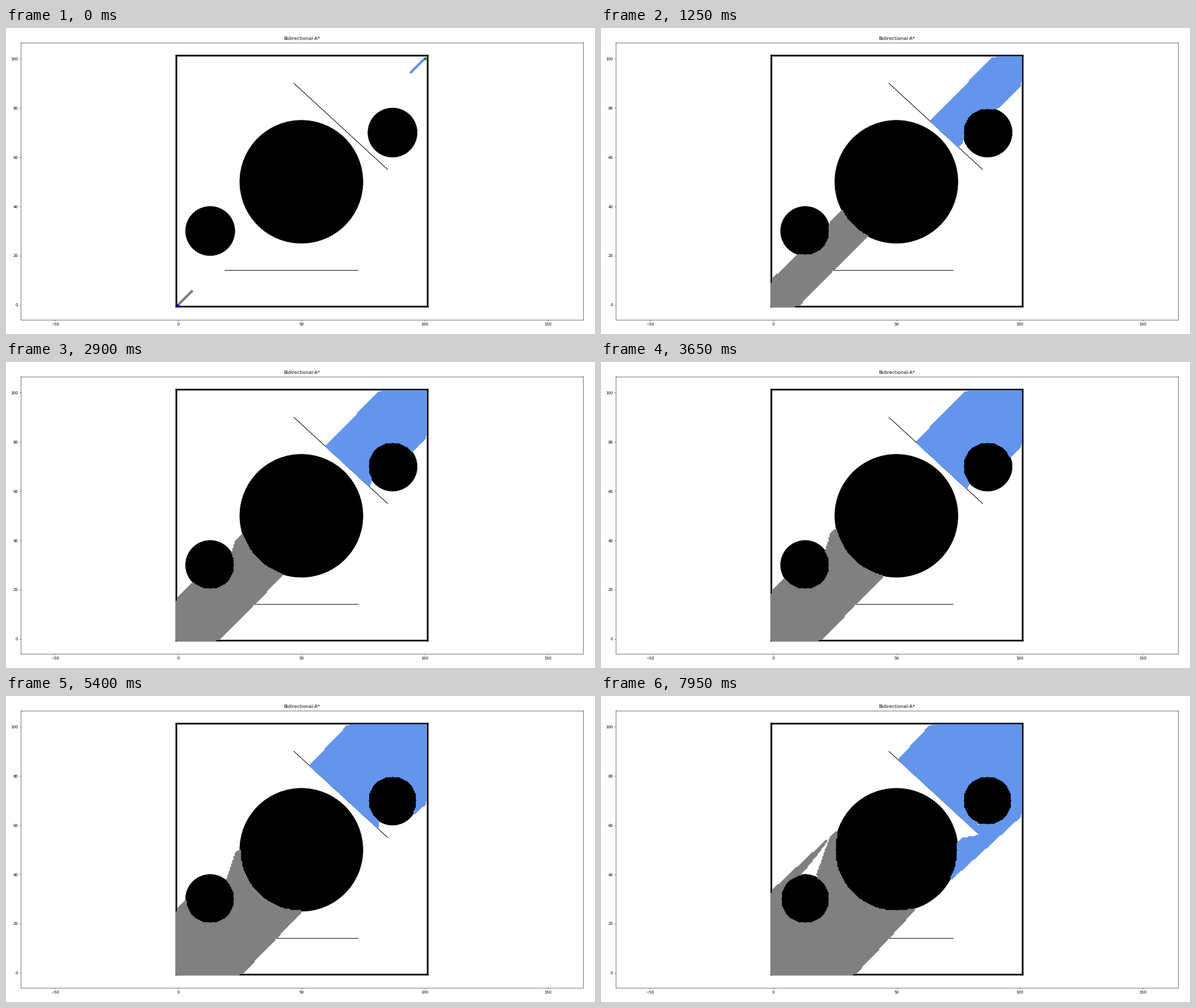
These frames come from a looping animation (1038x540 px, 8 s). A matplotlib script:

```python
import math

import matplotlib.pyplot as plt
import numpy as np
from matplotlib.animation import FuncAnimation
from matplotlib.patches import Circle, Rectangle

plt.rcParams["path.simplify"] = False
plt.rcParams["text.hinting"] = "none"

WIDTH, HEIGHT, DPI = 1038, 540, 49.5
FRAMES, INTERVAL = 160, 50

# The search runs on a grid with half-unit cells, addressed by integers.
STEP = 0.5
LOW, HIGH = -2, 202
START, GOAL = (0, 0), (200, 200)
MAX_POPS = 18000
MOVES = [(-1, 0), (-1, 1), (0, 1), (1, 1), (1, 0), (1, -1), (0, -1), (-1, -1)]

CIRCLES = [(13, 30, 10), (50, 50, 25), (87, 70, 10)]
SEGMENTS = [(47, 90, 85, 55), (19, 14, 73, 14)]
BORDER = [
    (-1, -1, 0.5, 102.5),
    (101, -1, 0.5, 102.5),
    (-1, -1, 102.5, 0.5),
    (-1, 101, 102.5, 0.5),
]

# Frame -> how far the forward search has spread along the border, in cells.
SPREAD = {25: 17, 58: 30, 89: 42, 108: 49, 130: 57, 159: 64}
REDRAW_COST = 2500


def build_walls():
    walls = set()
    cells = range(LOW, HIGH + 1)
    for i in cells:
        walls |= {(LOW, i), (HIGH, i), (i, LOW), (i, HIGH)}
        for j in cells:
            x, y = i * STEP, j * STEP
            if any((x - a) ** 2 + (y - b) ** 2 <= r * r for a, b, r in CIRCLES):
                walls.add((i, j))
    for x0, y0, x1, y1 in SEGMENTS:
        slope = (y1 - y0) / (x1 - x0)
        for i in range(int(x0 / STEP), int(x1 / STEP) + 1):
            y = y0 + slope * (i * STEP - x0)
            walls.add((i, round(y / STEP)))
    return walls


def search(start, goal, walls):
    """Return the cells in the order A* expands them, without the start."""
    cost = {start: 0.0}
    nodes = [start]
    keys = np.full(8 * MAX_POPS + 1, np.inf)
    keys[0] = 0.0
    order = []
    for _ in range(MAX_POPS):
        best = int(keys[:len(nodes)].argmin())
        if keys[best] == np.inf:
            break
        keys[best] = np.inf
        x, y = nodes[best]
        order.append((x, y))
        for dx, dy in MOVES:
            cell = (x + dx, y + dy)
            if cell in walls or (x + dx, y) in walls or (x, y + dy) in walls:
                continue
            new_cost = cost[x, y] + math.hypot(dx, dy)
            if new_cost < cost.get(cell, math.inf):
                cost[cell] = new_cost
                left = math.hypot(goal[0] - cell[0], goal[1] - cell[1])
                keys[len(nodes)] = new_cost + left
                nodes.append(cell)
    return order[1:]


def work(count):
    """Time to draw count cells: every redraw costs more than the last."""
    return count * count + REDRAW_COST * count


def build_schedule(order):
    frames, totals = [0], [work(11)]
    for frame, reach in SPREAD.items():
        edge = [c for k in (reach, reach + 1) for c in ((k, -1), (-1, k))]
        frames.append(frame)
        totals.append(work(np.mean([order.index(c) for c in edge])))
    total = np.interp(np.arange(FRAMES), frames, totals)
    half = REDRAW_COST / 2
    counts = np.sqrt(half * half + total) - half
    return [10 * int(n / 10) + 1 for n in counts]


def row_runs(cells):
    """Join visited cells into horizontal strokes separated by gaps."""
    size = HIGH - LOW + 1
    grid = np.zeros((size, size + 2), dtype=int)
    xy = np.array(cells) - LOW
    grid[xy[:, 1], xy[:, 0] + 1] = 1
    change = np.diff(grid, axis=1)
    rows, first = np.nonzero(change == 1)
    last = np.nonzero(change == -1)[1] - 1
    gap = np.full(len(rows), np.nan)
    x0 = (first + LOW) * STEP - 0.01
    x1 = (last + LOW) * STEP + 0.01
    y = (rows + LOW) * STEP
    return np.column_stack([x0, x1, gap]).ravel(), np.column_stack([y, y, gap]).ravel()


walls = build_walls()
forward = search(START, GOAL, walls)
backward = search(GOAL, START, walls)
schedule = build_schedule(forward)

fig = plt.figure(figsize=(WIDTH / DPI, HEIGHT / DPI), dpi=DPI)
left, right, top, bottom = 26.2, 1017.0, 25.5, 515.1
ax = fig.add_axes([left / WIDTH, 1 - bottom / HEIGHT,
                   (right - left) / WIDTH, (bottom - top) / HEIGHT])
y_span = 112.75
x_half = y_span * (right - left) / (bottom - top) / 2
ax.set_xlim(50.25 - x_half, 50.25 + x_half)
ax.set_ylim(-6.125, -6.125 + y_span)
ax.set_xticks(range(-50, 151, 50))
ax.set_yticks(range(0, 101, 20))
ax.set_title("Bidirectional-A*")

for x, y, w, h in BORDER:
    ax.add_patch(Rectangle((x, y), w, h, color="black", snap=False))
for x, y, r in CIRCLES:
    ax.add_patch(Circle((x, y), r, color="black"))
for x0, y0, x1, y1 in SEGMENTS:
    ax.plot([x0, x1], [y0, y1], color="black", snap=False,
            scalex=False, scaley=False)
for (x, y), style in ((START, "bs"), (GOAL, "gs")):
    ax.plot(x * STEP, y * STEP, style, scalex=False, scaley=False)


def trail(color):
    line, = ax.plot([], [], color=color, linewidth=7, solid_capstyle="round",
                    snap=False, scalex=False, scaley=False)
    return line


trails = [(trail("gray"), forward), (trail("cornflowerblue"), backward)]


def update(frame):
    for line, order in trails:
        line.set_data(*row_runs(order[:schedule[frame]]))
    return [line for line, _ in trails]


anim = FuncAnimation(fig, update, frames=FRAMES, interval=INTERVAL, repeat=True)
plt.show()
```
